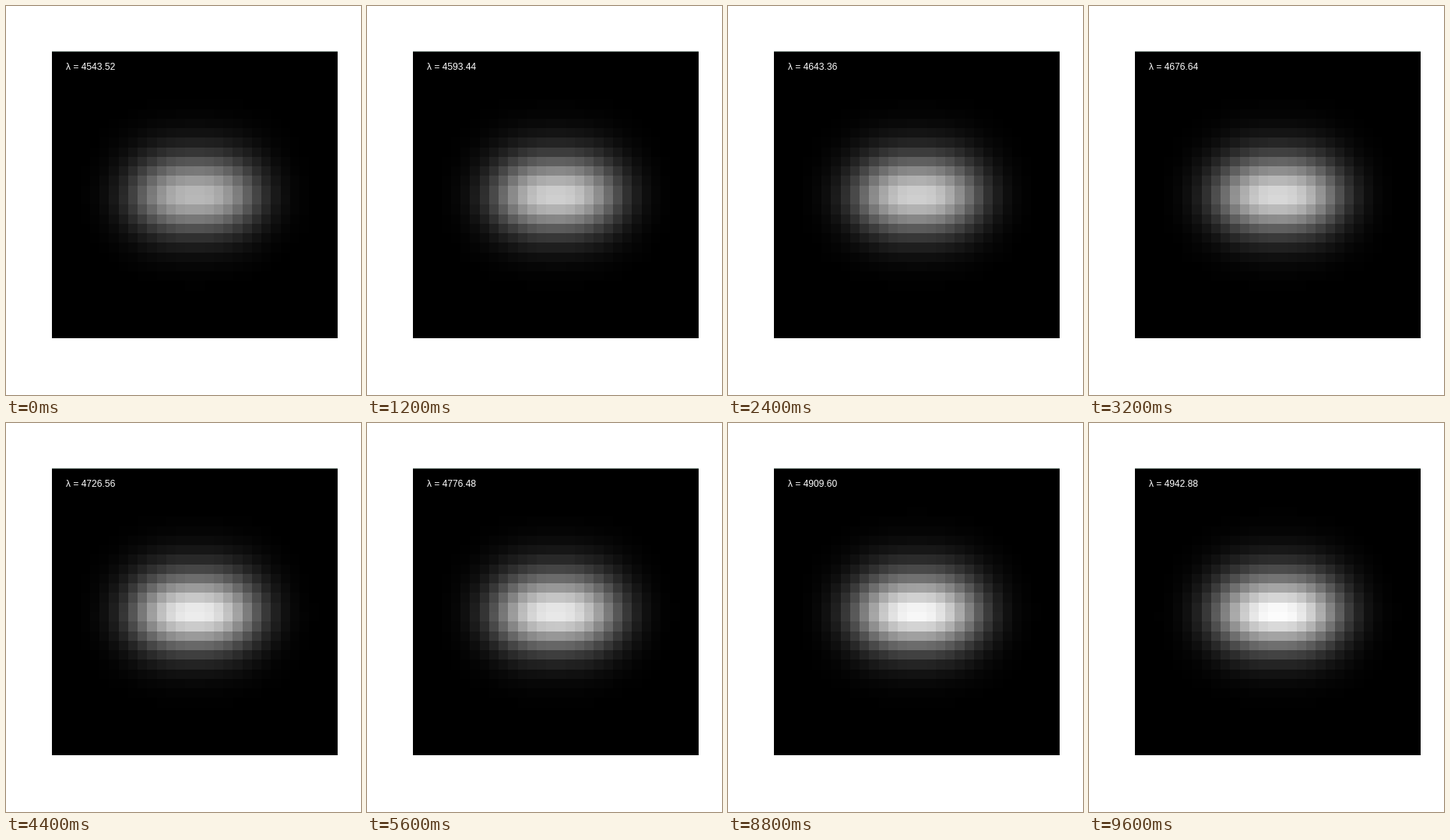
These frames come from a looping animation (456x500 px, 10 s). A matplotlib script:

```python
import numpy as np
import matplotlib.pyplot as plt
from matplotlib.animation import FuncAnimation
from matplotlib.patches import Rectangle

W, H, DPI = 456, 500, 64
FRAMES, INTERVAL = 25, 400
N = 30                                  # cells per side
X0, X1, Y0, Y1 = 59, 426, 59, 427       # picture box in pixels
START, STEP = 4543.52, 16.64            # wavelength scale

# Peak grey level along the spectrum, with a narrow dip at step 6
KNOTS = [0, 5, 6, 7, 8, 9, 11, 14, 19, 24]
LEVELS = [184, 222, 207, 217, 216, 228, 236, 232, 238, 252]


def blob():
    """Flat-topped light profile, a little more extended upwards."""
    dx = np.abs(np.arange(N) - 14.55)
    dy = np.arange(N) - 14.6
    scale = np.where(dy < 0, 4.1, 3.75)
    across = np.exp(-(dx / 6.5) ** 2.6)
    down = np.exp(-(np.abs(dy) / scale) ** 1.8)
    shape = np.outer(down, across)
    return shape / shape.max()


SHAPE = blob()

fig = plt.figure(figsize=(W / DPI, H / DPI), dpi=DPI, facecolor="white")
ax = fig.add_axes([0, 0, 1, 1])
ax.axis("off")

image = ax.imshow(SHAPE, cmap="gray", vmin=0, vmax=255, aspect="auto",
                  interpolation="nearest", extent=(X0, X1, Y1, Y0))
ax.add_patch(Rectangle((X0, Y0 - 1), X1 - X0, 1, fc="#76867e", lw=0))
label = ax.text(77, 82, "", color="white", family="Liberation Sans",
                fontsize=12 * 72 / DPI, ha="left", va="baseline")
ax.set_xlim(0, W)
ax.set_ylim(H, 0)


def draw(i):
    image.set_data(SHAPE * np.interp(i, KNOTS, LEVELS))
    label.set_text(f"λ = {START + STEP * i:.2f}")
    return image, label


anim = FuncAnimation(fig, draw, frames=FRAMES, interval=INTERVAL,
                     init_func=lambda: draw(0), repeat=True, repeat_delay=0)
plt.show()
```
